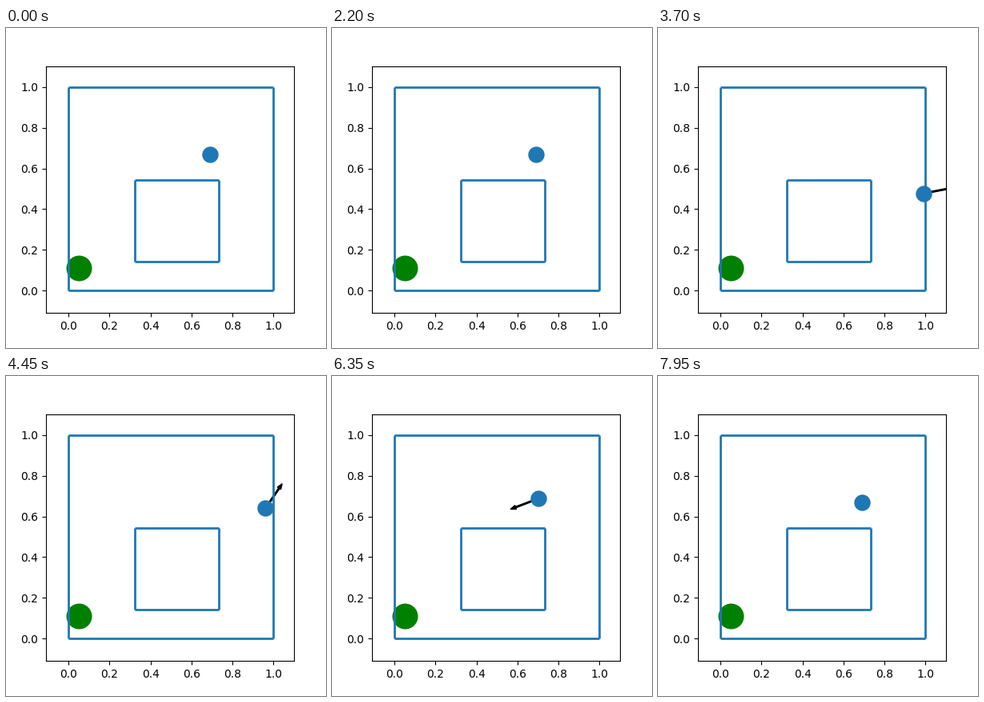
Recreate the animation shown at these times as a matplotlib script. Size 400 by 400 pixels, loop 8 s.

```python
import math

import matplotlib.pyplot as plt
from matplotlib.animation import FuncAnimation
from matplotlib.collections import LineCollection
from matplotlib.patches import FancyArrow

TICKS = 160
STEP_MS = 50
START = (0.69, 0.671)
GOAL = (0.05, 0.112)
REACH = 0.146
SWAY = 0.02    # sideways drift between waypoints
SWERVE = 20    # heading swing between waypoints, degrees

# Reset tick -> waypoints (tick, x, y, heading in degrees)
EPISODES = {
    1: [(17, 0.92, 0.61, -10), (27, 0.803, 0.665, -17), (43, 0.97, 0.68, 80)],
    44: [(60, 0.80, 0.40, -80), (74, 0.989, 0.477, 11), (100, 0.94, 0.73, 90)],
    101: [(105, 0.627, 0.724, 241), (118, 0.60, 0.95, 80)],
    119: [(127, 0.702, 0.688, 201), (158, 0.34, 0.95, 85)],
    159: [],
}


def box_sides(x0, y0, x1, y1):
    corners = [(x0, y0), (x1, y0), (x1, y1), (x0, y1)]
    return [(corners[i], corners[(i + 1) % 4]) for i in range(4)]


def pose(tick):
    """Agent position and heading (None right after a reset)."""
    reset = max(r for r in EPISODES if r <= max(tick, 1))
    if tick <= reset:
        return *START, None
    points = EPISODES[reset]
    keys = [(reset, *START, points[0][3])] + points
    a, b = next((a, b) for a, b in zip(keys, keys[1:]) if tick <= b[0])
    u = (tick - a[0]) / (b[0] - a[0])
    x, y, heading = (p + (q - p) * u for p, q in zip(a[1:], b[1:]))
    bulge = math.sin(math.pi * u)
    y += SWAY * bulge * math.sin(0.8 * tick)
    heading += SWERVE * bulge * math.sin(2.4 * tick)
    return x, y, math.radians(heading)


def disc(center, radius_px, color):
    size = (2 * radius_px * 72 / fig.dpi) ** 2
    return ax.scatter(*center, s=size, color=color, linewidths=0)


fig, ax = plt.subplots(figsize=(4, 4), dpi=100)
ax.set_xlim(-0.11, 1.1)
ax.set_ylim(-0.11, 1.102)

walls = box_sides(0, 0, 1, 1) + box_sides(0.325, 0.142, 0.735, 0.542)
ax.add_collection(LineCollection(walls, colors="C0", linewidths=2))
disc(GOAL, 16, "green")
agent = disc(START, 10.2, "C0")
arrow = FancyArrow(*START, REACH, 0, width=0.006, head_width=0.02,
                   head_length=0.027, length_includes_head=True,
                   color="black", zorder=0.9)
ax.add_patch(arrow)


def update(tick):
    x, y, heading = pose(tick)
    agent.set_offsets([(x, y)])
    arrow.set_visible(heading is not None)
    if heading is not None:
        arrow.set_data(x=x, y=y, dx=REACH * math.cos(heading),
                       dy=REACH * math.sin(heading))
    return agent, arrow


anim = FuncAnimation(fig, update, frames=TICKS, interval=STEP_MS,
                     init_func=lambda: update(0), repeat=True, repeat_delay=0)
plt.show()
```
